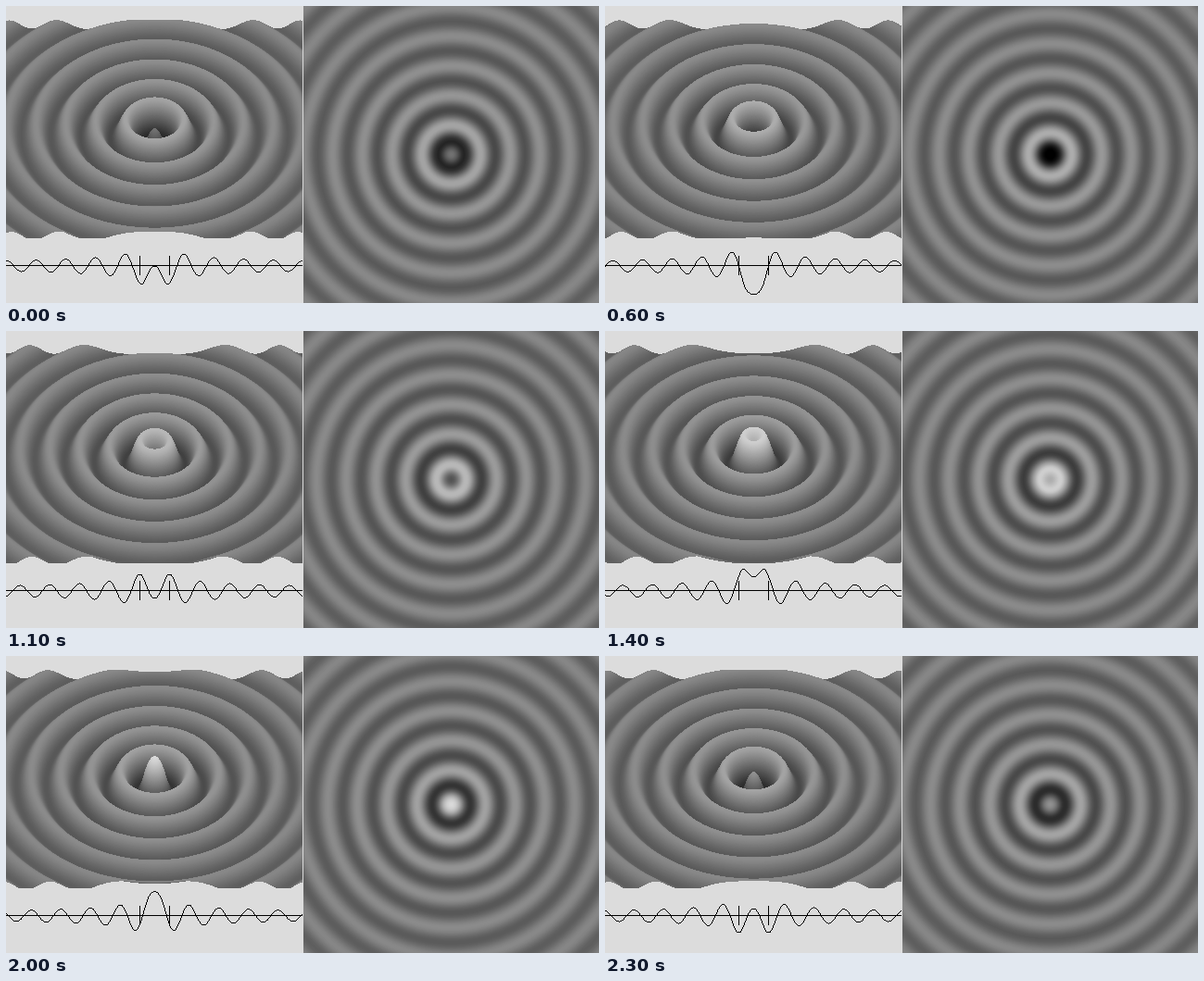
A matplotlib script that plays this animation: 640 px wide and 321 px high, repeating every 2400 ms.

```python
import numpy as np
import matplotlib.pyplot as plt
from matplotlib.animation import FuncAnimation

W, H, DPI = 640, 321, 100
FRAMES, INTERVAL = 24, 100
WAVELENGTH, CORE = 32, 16       # core: radius of the smooth centre
PEAK, RIM = 30.5, 18.2          # amplitude at the centre and at the core's edge
TILT, LIFT = np.sqrt(0.5), 0.9  # screen scale of depth and height
MID_Y, FLOOR_Y, AXIS_Y = 133.5, 251, 280
BACK = 220 / 255


def wave(r, turn):
    """Height of the incoming circular wave at radius r, turn in [0, 1)."""
    q = r / CORE
    inside = q < 1
    amp = np.where(inside, PEAK - (PEAK - RIM) * q**2,
                   RIM / np.sqrt(np.maximum(q, 1)))
    phase = np.where(inside, np.pi / 2 * (1 + q**2), 2 * np.pi * r / WAVELENGTH)
    return amp * np.cos(phase + 2 * np.pi * turn)


def shade(z):
    return np.clip(114 + 3.9 * z, 0, 255) / 255


cols = np.arange(320)
depth = np.arange(-160, 162, 0.125)
surface_r = np.hypot(cols - 160, depth[:, None])
plan_r = np.hypot(np.arange(321, W) - 480, np.arange(H)[:, None] - 160)
section_r = np.abs(cols - 160.0)


def draw_surface(img, turn):
    z = wave(surface_r, turn)
    rows = np.floor(MID_Y + TILT * depth[:, None] - LIFT * z).astype(int)
    for row, grey in zip(rows, shade(z)):      # back to front
        img[row, cols] = grey
    img[FLOOR_Y:, :320] = BACK


def draw_section(img, turn):
    img[AXIS_Y, :320] = 0
    for x in (160 - CORE, 160 + CORE):
        img[AXIS_Y - 10:AXIS_Y + 11, x] = 0
    ys = np.floor(AXIS_Y + 1 - wave(section_r, turn)).astype(int)
    for x, (a, b) in enumerate(zip(ys, ys[1:])):
        n = max(1, abs(b - a))
        step = np.arange(n + 1)
        img[a + np.sign(b - a) * step, x + (2 * step > n)] = 0


def render(turn):
    img = np.full((H, W), BACK)
    img[:, 321:] = shade(wave(plan_r, turn))
    draw_surface(img, turn)
    draw_section(img, turn)
    return img


fig = plt.figure(figsize=(W / DPI, H / DPI), dpi=DPI)
ax = fig.add_axes([0, 0, 1, 1])
ax.axis("off")
picture = ax.imshow(render(0), cmap="gray", vmin=0, vmax=1,
                    extent=(0, W, H, 0), interpolation="nearest", aspect="auto")


def update(i):
    picture.set_data(render(i / FRAMES))
    return picture,


anim = FuncAnimation(fig, update, frames=FRAMES, interval=INTERVAL,
                     repeat=True, repeat_delay=0, blit=False)
plt.show()
```
